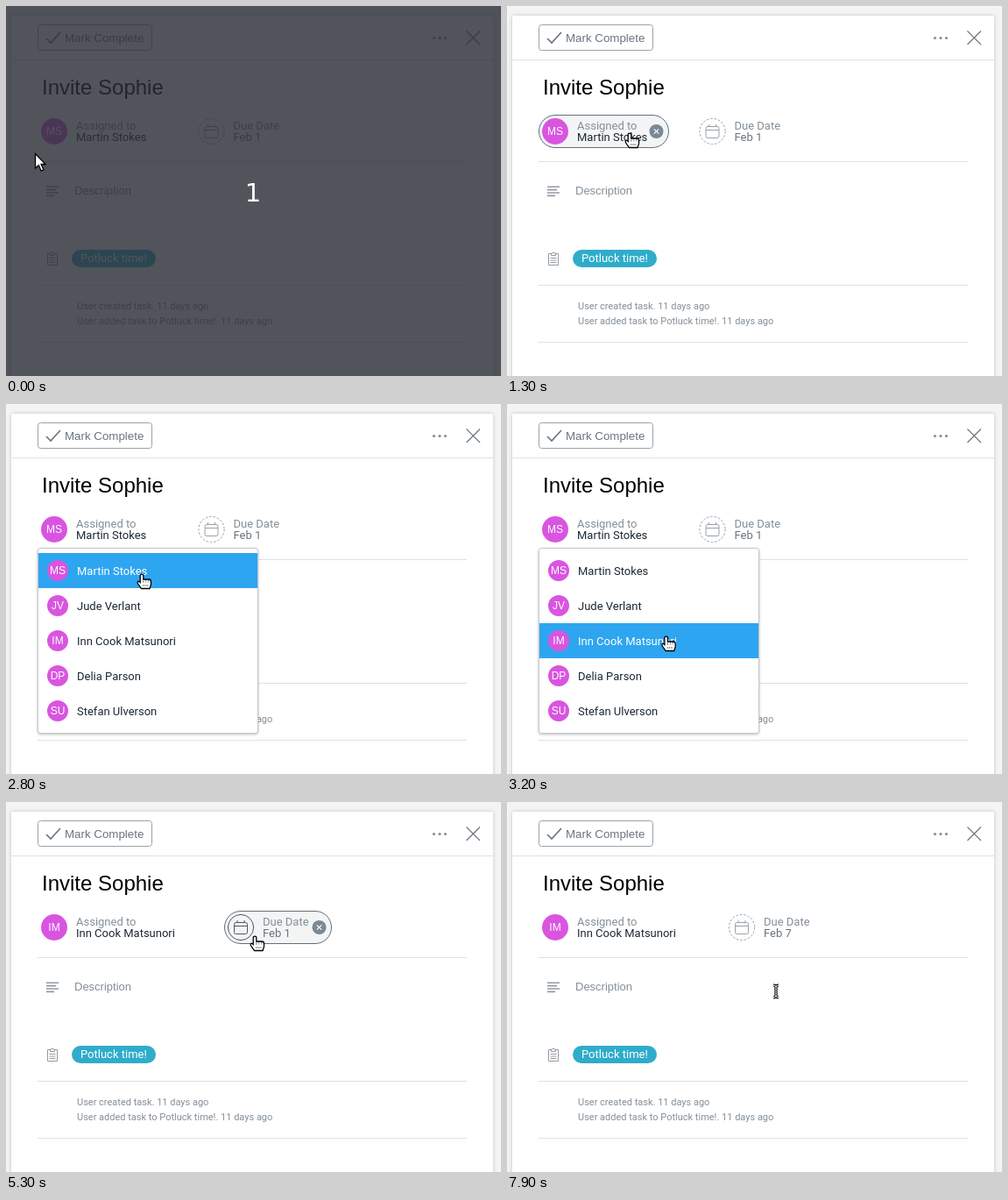
These frames come from a looping animation (565x422 px, 8 s). An HTML page:

```html
<!DOCTYPE html>
<html lang="en">
<head>
<meta charset="utf-8">
<title>Task card</title>
<style>
  html, body { margin: 0; width: 100%; height: 100%; overflow: hidden; background: #f3f4f4; }
  svg { display: block; width: 565px; height: 422px; }
  text { font: 13px Roboto, sans-serif; white-space: pre; }
  .arial { font-family: "Liberation Sans", Arial, sans-serif; }
  .mid { text-anchor: middle; }
  .muted { fill: #848f99; }
  .dark { fill: #1b2734; }
  .white { fill: #fff; }
  .small { font-size: 11px; }
  .line { fill: none; stroke: #69747f; }
  .rule { fill: none; stroke: #dfe1e3; }
</style>
</head>
<body>
<svg id="stage" viewBox="0 0 565 422" xmlns="http://www.w3.org/2000/svg"></svg>
<script>
const LOOP = 8000, STEP = 100;
const people = ["Martin Stokes", "Jude Verlant", "Inn Cook Matsunori", "Delia Parson", "Stefan Ulverson"];
const initials = ["MS", "JV", "IM", "DP", "SU"];

// Pointer moves: start time, number of steps, end point.
const home = [33.5, 168.5];
const moves = [
  [700, 1, 26.5, 172], [800, 2, 88, 174], [1100, 3, 140, 145],
  [2600, 3, 155, 194], [2900, 5, 184.5, 272.5],
  [4300, 4, 183, 214.5], [4900, 5, 284, 153],
  [5900, 7, 404, 286], [7300, 3, 397.5, 284.5], [7700, 3, 307, 216]
];

const text = (x, y, s, cls = "", extra = "") => `<text x="${x}" y="${y}" class="${cls}" ${extra}>${s}</text>`;
const rect = (x, y, w, h, r, extra) => `<rect x="${x}" y="${y}" width="${w}" height="${h}" rx="${r}" ${extra}/>`;
const path = (d, extra) => `<path d="${d}" ${extra}/>`;
const circle = (x, y, r, extra) => `<circle cx="${x}" cy="${y}" r="${r}" ${extra}/>`;
const avatar = (x, y, r, s, id = "") =>
  circle(x, y, r, 'fill="#d955e0"') + text(x, y + 4.3, s, "arial mid white", `style="font-size:12px" ${id}`);

function pill(id, x, w) {
  const cx = x + w - 14;
  return `<g id="${id}">` +
    rect(x, 124.5, w, 37, 18.5, 'fill="#f3f5f5" stroke="#646f79"') +
    circle(cx, 143, 8, 'fill="#7c8894"') +
    path(`M${cx - 2.7} 140.3l5.4 5.4m0-5.4l-5.4 5.4`, 'stroke="#fff" stroke-width="1.2"') + "</g>";
}

function card() {
  return rect(6, 11, 550, 420, 2, 'fill="#fff" style="filter:drop-shadow(0 0 2px #0003)"') +
    path("M6 61.5H556M36 177.5H526M36 318.5H526M36 383.5H526", 'class="rule"') +
    rect(36.5, 21.5, 130, 29, 3, 'fill="#fff" stroke="#9aa2aa"') +
    path("M46 37l5 5 11-12", 'class="line" stroke-width="1.6"') +
    text(67, 41, "Mark Complete", "arial", 'fill="#69747f" style="font-size:13.333px"') +
    [488.5, 495, 501.5].map(x => circle(x, 36.5, 1.6, 'fill="#848f99"')).join("") +
    path("M525.5 28.5l15.5 15.5m0-15.5l-15.5 15.5", 'class="line" stroke-width="1.1"') +
    text(41, 101, "Invite Sophie", "arial", 'style="font-size:24px"') +
    path("M46 206.2h14M46 209.6h11M46 213h14M46 216.4h9", 'stroke="#929aa3" stroke-width="1.6"') +
    text(78, 215, "Description", "arial muted") +
    path("M50.5 282.5H47.5V295.5H58.5V282.5H55.5M50.5 284.5v-2.5h1.5q1-2.5 2 0h1.5v2.5zM49.5 287.5h7M49.5 290h7M49.5 292.5h7",
      'fill="none" stroke="#929aa3"') +
    rect(75, 278, 96, 20, 10, 'fill="#30accb"') +
    text(85, 292, "Potluck time!", "white") +
    text(81, 346, "User created task. 11 days ago", "muted small") +
    text(81, 363, "User added task to Potluck time!. 11 days ago", "muted small");
}

function fields() {
  return pill("pillA", 36.5, 148) +
    avatar(55, 143, 15, "MS", 'id="badge"') +
    text(80, 141, "Assigned to", "muted") + text(80, 154, "", "dark", 'id="owner"') +
    '<g id="due">' + pill("pillB", 216, 122) +
    '<g id="dueIcon" fill="none">' + circle(234.5, 143, 14.6, 'id="ring"') +
    path("M229 137.5h11q2 0 2 2v9q0 2-2 2h-11q-2 0-2-2v-9q0-2 2-2zM227 141.5h15M230.5 135v3M238.5 135v3", "") + "</g>" +
    text(259.5, 141, "Due Date", "muted") + text(259.5, 154, "", "", 'id="date" fill="#69747f"') + "</g>";
}

function menu() {
  return '<g id="menu">' +
    rect(36.5, 164.5, 251, 211, 3, 'fill="#fff" stroke="#c3c8cc" style="filter:drop-shadow(0 1px 1.5px #0004)"') +
    rect(37, 170, 250, 40, 0, 'id="bar" fill="#2ea5f0"') +
    people.map((p, i) => avatar(59, 190 + 40 * i, 12, initials[i]) +
      text(81, 194.7 + 40 * i, p, "", `id="row${i}"`)).join("") + "</g>";
}

const cellX = c => 272.7 + 32.45 * c, cellY = r => 252 + 32.3 * r;
const tile = (id, fill) => rect(-14, -13.5, 28, 27, 4.8, `id="${id}" fill="${fill}"`);

function calendar() {
  let s = '<g id="cal">' +
    rect(249.5, 172.5, 241, 231, 4.5, 'fill="#fff"') +
    path("M250 228.5V177q0-4.5 4.5-4.5H486q4.5 0 4.5 4.5V228.5z", 'fill="#eceeee"') +
    path("M250 228.5H490", 'stroke="#aeaeae"') +
    rect(249.5, 172.5, 241, 231, 4.5, 'fill="none" stroke="#aeaeae"') +
    path("M292 173l8.5-8.5 8.5 8.5", 'fill="#eceeee" stroke="#aeaeae"') +
    path("M274 183v13l-7.5-6.5zM466 183v13l7.5-6.5z", 'fill="#c8cacb"') +
    text(370, 194, "February 2019", "arial mid", 'style="font-size:15px;font-weight:bold"') +
    tile("hot", "#eceeee") + tile("sel", "#216ba5");
  ["Su", "Mo", "Tu", "We", "Th", "Fr", "Sa"].forEach((d, c) => s += text(cellX(c), 217, d, "arial mid"));
  for (let i = 0; i < 35; i++) {
    const day = i < 5 ? 27 + i : i < 33 ? i - 4 : i - 32;
    s += text(cellX(i % 7), cellY(Math.floor(i / 7)) + 4.4, day, "arial mid" + (i === 5 ? " white" : ""),
      i === 1 ? 'style="font-weight:bold"' : "");
  }
  return s + "</g>";
}

function pointers() {
  const beam = "M-3-7q3 0 3 2.2V4.8Q0 7-3 7M3-7q-3 0-3 2.2M0 4.8Q0 7 3 7";
  return '<g id="pointer">' +
    path("M0 0V16.5l3.8-3.5 2.8 6.5 2.8-1.2-2.8-6.3h5z", 'id="arrow" fill="#fff" stroke="#000" stroke-width="1.3"') +
    '<g id="hand" stroke="#000" stroke-width="1.3">' +
    path("M-1.8 9.5V1.8Q-1.8.2 0 .2T1.8 1.8V6H8Q10.5 6 10.5 8.5V12L9 16.5H-.5L-4.7 10.5Q-5.2 8-3.2 8.3z", 'fill="#fff"') +
    path("M1.8 6v3.5M4.7 6.3v3M7.6 6.5v2.8M1 13h7", 'fill="none" stroke-width=".9" stroke-dasharray="1.2 1"') + "</g>" +
    '<g id="beam" fill="none">' + path(beam, 'stroke="#000" stroke-width="3.2"') +
    path(beam, 'stroke="#fff" stroke-width="1"') + "</g></g>";
}

document.getElementById("stage").innerHTML = card() + fields() + menu() + calendar() +
  '<g id="shade">' + rect(0, 0, 565, 422, 0, 'fill="#2b2e37" opacity=".815"') +
  text(282, 223, "1", "white mid", 'id="count" style="font:29px \'DejaVu Sans\',sans-serif"') + "</g>" + pointers();

const el = {};
document.querySelectorAll("[id]").forEach(n => el[n.id] = n);
const show = (id, on) => el[id].style.display = on ? "" : "none";
const attr = (id, set) => Object.entries(set).forEach(([k, v]) => el[id].setAttribute(k, v));
const say = (id, s) => { if (el[id].textContent !== s) el[id].textContent = s; };
const place = (id, x, y) => attr(id, { transform: `translate(${x} ${y})` });
const ease = u => (1 - Math.cos(Math.PI * u)) / 2;

function pointAt(t) {
  let [x, y] = home;
  for (const [start, n, tx, ty] of moves) {
    if (t < start) break;
    const u = ease(Math.min(1, ((t - start) / STEP + 1) / n));
    x += (tx - x) * u;
    y += (ty - y) * u;
  }
  return [x, y];
}

function draw(ms) {
  const t = Math.floor(ms / STEP) * STEP;
  const [x, y] = pointAt(t);
  const within = (l, top, r, b) => x >= l && x <= r && y >= top && y <= b;
  const menuOn = t >= 2100 && t < 3900, calOn = t >= 5600 && t < 7200;
  const moved = t >= 3900, shift = moved ? 33.5 : 0;
  const overA = !moved && within(36, 124, 185, 162);
  const overB = moved && within(249, 124, 372, 162);

  show("shade", t < 200);
  show("count", t < 100);
  attr("shade", { opacity: t < 100 ? 1 : 0.5 });

  show("pillA", overA);
  show("pillB", overB);
  say("badge", initials[moved ? 2 : 0]);
  say("owner", people[moved ? 2 : 0]);
  say("date", t >= 7200 ? "Feb 7" : "Feb 1");
  place("due", shift, 0);
  attr("dueIcon", { stroke: overB ? "#4d5660" : "#99a1a9" });
  attr("ring", { "stroke-dasharray": overB ? "none" : "2.6 1.8" });

  show("menu", menuOn);
  const row = Math.max(0, Math.min(4, Math.floor((y - 170) / 40)));
  attr("bar", { y: 170 + 40 * row });
  people.forEach((p, i) => attr("row" + i, { fill: i === row ? "#fff" : "#1b2734" }));

  show("cal", calOn);
  const c = Math.round((x - cellX(0)) / 32.45), r = Math.round((y - cellY(0)) / 32.3);
  const onDay = calOn && c >= 0 && c < 7 && r >= 0 && r < 5 &&
    Math.abs(x - cellX(c)) < 14 && Math.abs(y - cellY(r)) < 13.5;
  show("hot", onDay);
  place("hot", cellX(c), cellY(r));
  place("sel", cellX(5), cellY(0));

  const hand = overA || overB || onDay || (menuOn && within(37, 164, 287, 376)) || t === 3900 || t === 7200;
  const beam = !hand && !menuOn && !calOn && within(37, 198, 526, 264);
  show("hand", hand);
  show("beam", beam);
  show("arrow", !hand && !beam);
  place("pointer", x, y);
}

const began = performance.now();
function tick() {
  draw((performance.now() - began) % LOOP);
  requestAnimationFrame(tick);
}
tick();
</script>
</body>
</html>
```
